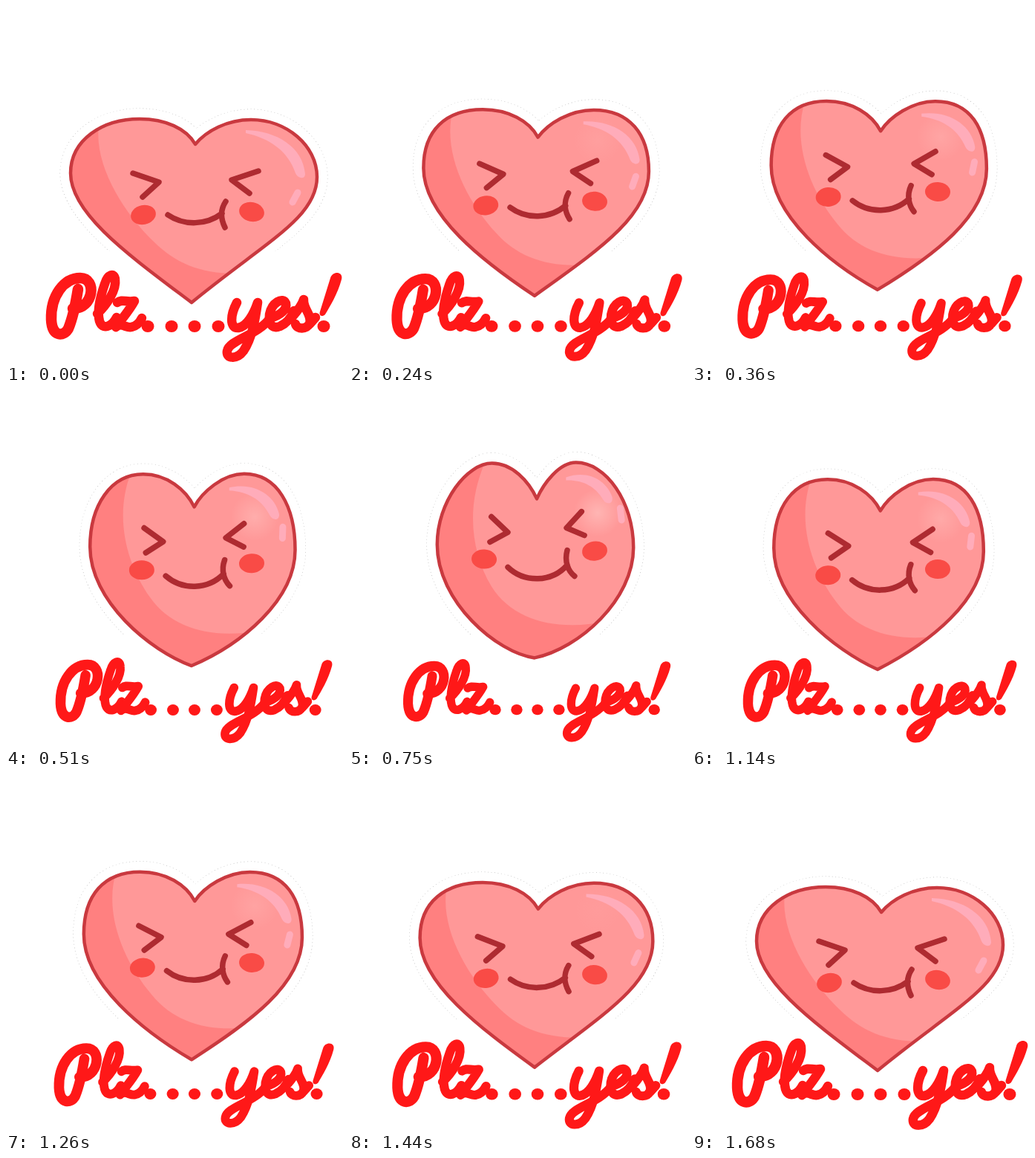
These frames come from a looping animation (454 by 479 pixels, 1.71 s). An HTML page with a canvas:

```html
<!DOCTYPE html>
<html lang="en">
<head>
<meta charset="utf-8">
<title>Plz....yes!</title>
<style>
  html, body { margin: 0; width: 100%; height: 100%; overflow: hidden; background: #fff; }
  canvas { display: block; }
</style>
</head>
<body>
<canvas id="stage" width="454" height="479" role="img" aria-label="Plz....yes!"></canvas>
<script>
const LOOP = 1710, STEP = 30, PEAK = 780, REST = 1600, TAU = Math.PI * 2;
const RED = '#ff1818';
const ctx = document.getElementById('stage').getContext('2d');
ctx.lineCap = ctx.lineJoin = 'round';

// Each shape: its squashed pose, then its stretched pose.
const heart = [
  'M255 186 C270 168 298 153 330 153 C378 153 419 188 419 230 C419 285 350 317 250 399' +
  ' C168 337 87 280 87 225 C87 180 130 152 180 152 C215 152 243 165 255 186Z',
  'M253 146 C262 125 283 97 305 97 C345 97 383 150 383 212 C383 282 310 348 250 360' +
  ' C200 354 119 285 119 208 C119 150 160 98 193 98 C220 98 242 122 253 146Z'
];
// Which progress drives each heart point: sides w, lobes q, the rest p.
const heartModes = 'ppqqqwwwwwwwwwqqqpp'.replace(/^(.{9})w/, '$1p');

const light = [
  'M127 150 C113 205 155 275 200 318 C228 345 260 360 310 360 L454 330 L454 90 L140 90Z',
  'M188 88 C157 150 163 215 192 264 C222 312 285 325 350 310 L454 280 L454 40 L200 40Z'
];
const shine = [
  'M323 167 C365 168 400 190 403 226 C403 234 393 232 390 225 C380 195 355 178 323 171Z',
  'M292 117 C322 106 347 122 354 143 C356 153 346 154 342 147 C331 128 313 120 292 121Z'
];
const glint = ['M393 251 L386 264', 'M365 158 L367 174'];
const face = [
  'M171 225 L206 237 L184 257 M340 222 L304 234 L328 252' +
  ' M218 281 C240 296 270 295 291 279 M296 263 C288 275 290 288 295 298',
  'M192 170 L214 191 L190 204 M313 163 L293 185 L317 195' +
  ' M214 238 C236 259 273 259 294 235 M294 215 C290 230 295 243 304 250'
];

// Script lettering, drawn with a round pen
const capital = new Path2D(
  'M97 381 C94 400 89 422 84 434 C78 445 62 446 61 422 C60 390 78 366 100 366 C123 366 118 408 90 407');
const letters = [
  'M123 414 C136 402 149 382 147 368 C146 358 137 361 133 374 C126 394 123 413 126 424 C130 437 143 431 149 419',
  'M150 399 C156 394 162 399 173 397 C166 410 156 421 148 432 C156 425 162 434 169 432 C175 431 180 426 183 420',
  'M311 399 C302 416 301 434 313 433 C325 431 334 414 339 399 C336 420 332 446 320 464' +
  ' C311 476 296 475 298 464 C301 449 338 444 356 420',
  'M356 420 C370 416 379 408 377 400 C373 391 358 399 355 415 C353 431 361 434 369 431 C378 427 384 420 388 410',
  'M385 419 C393 410 399 402 401 395 C400 408 413 416 409 427 C405 436 392 435 390 428 M409 428 L417 419'
].map(d => new Path2D(d));
const bang = new Path2D(
  'M437 366 C440 356 455 357 452 368 C447 387 436 405 430 415 C426 419 421 417 423 411Z');

const mix = (a, b, k) => a + (b - a) * k;
const wave = angle => (1 - Math.cos(angle)) / 2;

// Pairs up the numbers of two poses; lobes rise with p, sides take their own pace.
function morph([from, to], k, modes = '') {
  const ends = to.match(/\d+/g);
  let i = 0;
  return new Path2D(from.replace(/\d+/g, v => {
    let mode = modes[i >> 1] || 'p';
    if (i % 2 && mode === 'q') mode = 'p';
    return mix(+v, +ends[i++], k[mode]);
  }));
}

function stroke(path, color, width) {
  ctx.strokeStyle = color;
  ctx.lineWidth = width;
  ctx.stroke(path);
}

function fill(path, color) {
  ctx.fillStyle = color;
  ctx.fill(path);
}

function oval(x, y, rx, ry, tilt, color) {
  const path = new Path2D();
  path.ellipse(x, y, rx, ry, tilt, 0, TAU);
  fill(path, color);
}

function drawHeart(p) {
  const k = { p, w: p ** 0.6, q: p ** 3 };
  const outline = morph(heart, k, heartModes);

  // White sticker rim with a speckled edge that ends above the tip
  ctx.lineCap = 'butt';
  ctx.setLineDash([1, 3]);
  stroke(outline, '#b8b8b8', 29);
  ctx.setLineDash([]);
  ctx.lineCap = 'round';
  stroke(outline, '#fff', 28);
  ctx.fillStyle = '#fff';
  ctx.fillRect(0, 330, 454, 149);

  fill(outline, '#ff8080');
  ctx.save();
  ctx.clip(outline);
  fill(morph(light, k), '#ff9898');
  const y = mix(185, 165, p);
  const glow = ctx.createRadialGradient(335, y, 0, 335, y, 32);
  glow.addColorStop(0, `rgba(255,225,220,${0.4 * p})`);
  glow.addColorStop(1, 'rgba(255,225,220,0)');
  ctx.fillStyle = glow;
  ctx.fillRect(300, y - 35, 70, 70);
  ctx.restore();

  fill(morph(shine, k), '#ffacba');
  stroke(morph(glint, k), '#ffacba', 9);
  stroke(outline, '#c9393f', 4.5);

  oval(mix(185, 182, p), mix(281, 227, p), 17, 13, mix(-0.2, 0.05, p), '#f94b46');
  oval(331, mix(277, 216, p), 17, 13, mix(0.2, -0.15, p), '#f94b46');
  stroke(morph(face, k), '#ae2b31', 7.5);
}

function drawText(p) {
  const s = 1 - 0.1 * p;
  ctx.save();
  ctx.translate(253.5, 422);
  ctx.scale(s, s);
  ctx.translate(-253.5, -422);
  stroke(capital, RED, 14.5);
  for (const letter of letters) stroke(letter, RED, 12.5);
  fill(bang, RED);
  for (const x of [191, 223, 254, 286, 428]) oval(x, 431, 8.5, 8, 0, RED);
  ctx.restore();
}

// The heart stretches up to its peak, sinks back, then rests briefly.
function stretch(t) {
  const x = t < PEAK ? t / PEAK : Math.max(0, (REST - t) / (REST - PEAK));
  return mix(wave(Math.PI * x), x, 0.2);
}

function draw(now) {
  const t = Math.floor(now % LOOP / STEP) * STEP;
  ctx.fillStyle = '#fff';
  ctx.fillRect(0, 0, 454, 479);
  drawHeart(stretch(t));
  drawText(wave(TAU * t / LOOP));
}

let start;
function tick(now) {
  start ??= now;
  draw(now - start);
  requestAnimationFrame(tick);
}
requestAnimationFrame(tick);
</script>
</body>
</html>
```
